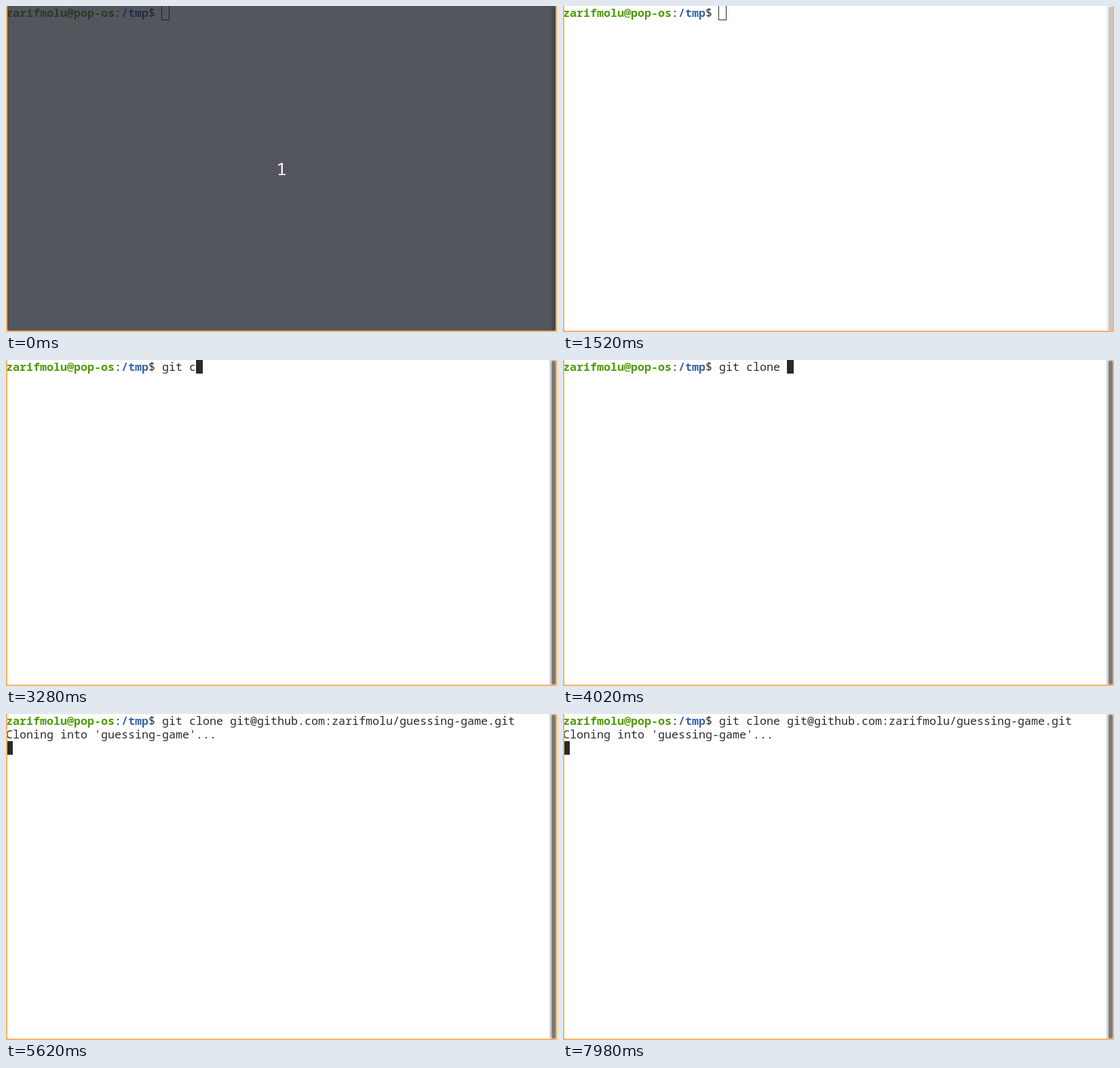
Write an HTML page with a canvas that moves like this. It is 812x480 px and loops after 8000 ms.

```html
<!DOCTYPE html>
<html lang="en">
<head>
<meta charset="utf-8">
<title>Terminal session</title>
<style>
  html, body { margin: 0; width: 100%; height: 100%; overflow: hidden; background: #fff; }
  canvas { display: block; }
</style>
</head>
<body>
<canvas id="stage" width="812" height="480"></canvas>
<script>
const ctx = document.getElementById('stage').getContext('2d');
const LOOP = 8000, CELL = 10, ROW = 20, PROMPT_COLS = 23;
const MONO = '"Noto Sans Mono", "DejaVu Sans Mono", monospace';
const INK = '#2a2a2a', GREEN = '#4e9a06', BLUE = '#3465a4', ORANGE = '#fab265';
const USER = 'zarifmolu';
const COMMAND = `git clone git@github.com:${USER}/guessing-game.git`;

// [time, characters typed]
const TYPING = [
  [0, 0], [2600, 1], [2720, 2], [2850, 3], [2970, 4], [3280, 5], [3400, 6],
  [3570, 7], [3640, 8], [3720, 9], [4020, 10], [5050, COMMAND.length]
];
// [time, cursor shown]
const BLINKS = [
  [0, true], [2190, false], [2580, true], [4600, false], [4700, true],
  [5420, false], [5600, true], [6180, false], [6780, true], [7380, false], [7980, true]
];
// [time, progress of the scrollbar towards its active colours]
const SCROLLBAR = [[0, 0], [1520, 0.1], [1590, 0.4], [1660, 0.9], [1950, 1]];
const COUNTDOWN_END = 20, FOCUS = 1590, ENTER = 5600, OUTPUT = 5620;

function valueAt(steps, t) {
  let value = steps[0][1];
  for (const [start, v] of steps) if (t >= start) value = v;
  return value;
}

function mix(from, to, p) {
  return `rgb(${from.map((c, i) => Math.round(c + (to[i] - c) * p)).join(',')})`;
}

function print(text, col, row, color = INK, weight = 400) {
  ctx.font = `${weight} 16.667px ${MONO}`;
  ctx.fillStyle = color;
  [...text].forEach((ch, i) => ctx.fillText(ch, (col + i) * CELL, row * ROW + 16));
}

function drawPrompt() {
  print(USER + '@pop-os', 0, 0, GREEN, 700);
  print(':', 16, 0);
  print('/tmp', 17, 0, BLUE, 700);
  print('$', 21, 0);
}

function drawCursor(col, row, focused) {
  const x = col * CELL, y = row * ROW;
  if (focused) {
    ctx.fillStyle = INK;
    ctx.fillRect(x, y, CELL, ROW);
  } else {
    ctx.strokeStyle = INK;
    ctx.lineWidth = 1;
    ctx.strokeRect(x - 0.5, y - 0.5, CELL + 1, ROW + 1);
  }
}

function drawScrollbar(p) {
  ctx.fillStyle = mix([240, 240, 240], [206, 208, 208], p);
  ctx.fillRect(801, 0, 9, 478);
  ctx.fillStyle = mix([204, 206, 206], [122, 124, 123], p);
  ctx.beginPath();
  ctx.roundRect(804, 1, 6, 477, 3);
  ctx.fill();
}

function drawCountdown() {
  ctx.fillStyle = 'rgba(26,30,39,0.75)';
  ctx.fillRect(0, 0, 812, 480);
  ctx.fillStyle = '#fff';
  ctx.font = `400 26px ${MONO}`;
  ctx.textAlign = 'center';
  ctx.fillText('1', 406, 249);
  ctx.textAlign = 'left';
}

function drawBorder() {
  ctx.fillStyle = ORANGE;
  ctx.beginPath();
  ctx.rect(0, 0, 812, 480);
  ctx.roundRect(2, 0, 808, 478, [0, 0, 2, 2]);
  ctx.fill('evenodd');
}

function draw(t) {
  ctx.fillStyle = '#fff';
  ctx.fillRect(0, 0, 812, 480);
  const typed = valueAt(TYPING, t);
  drawPrompt();
  print(COMMAND.slice(0, typed), PROMPT_COLS, 0);
  if (t >= OUTPUT) print("Cloning into 'guessing-game'...", 0, 1);
  if (valueAt(BLINKS, t)) {
    const row = t >= OUTPUT ? 2 : t >= ENTER ? 1 : 0;
    drawCursor(row ? 0 : PROMPT_COLS + typed, row, t >= FOCUS);
  }
  drawScrollbar(valueAt(SCROLLBAR, t));
  if (t < COUNTDOWN_END) drawCountdown();
  drawBorder();
}

const start = performance.now();
function tick() {
  draw((performance.now() - start) % LOOP);
  requestAnimationFrame(tick);
}
tick();
</script>
</body>
</html>
```
